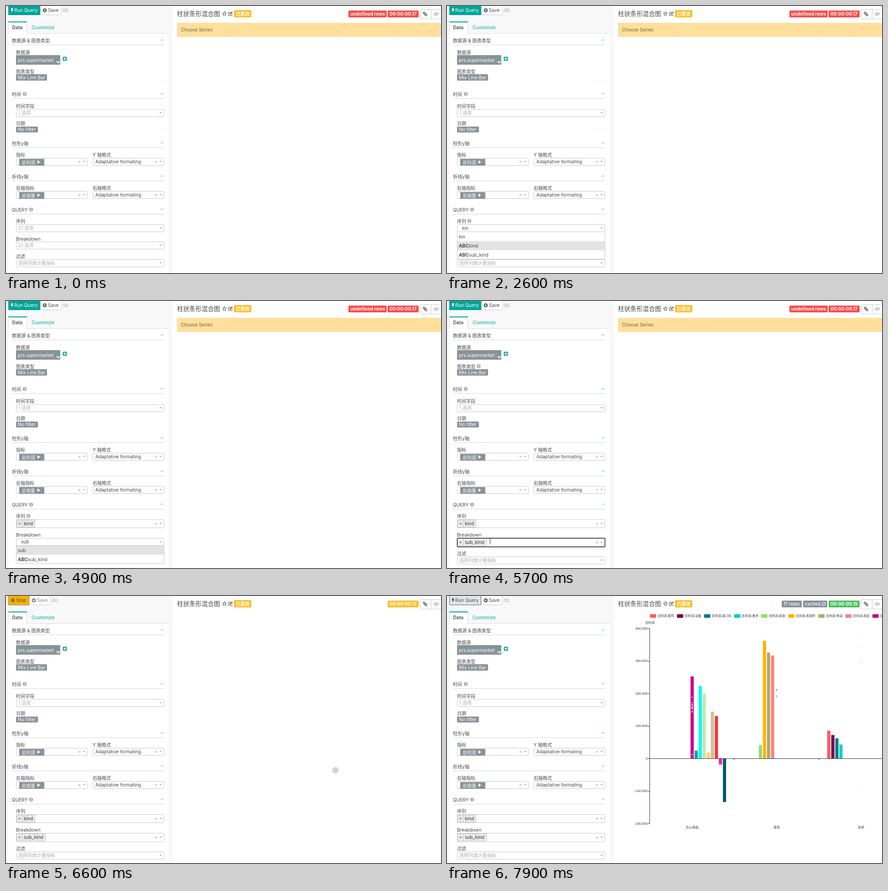
Recreate the animation shown at these times as an HTML page with a canvas. Size 954 px wide and 587 px high, loop 8 s.

```html
<!DOCTYPE html>
<html lang="zh-CN">
<head>
<meta charset="utf-8">
<title>Chart builder</title>
<style>
html, body { margin: 0; width: 100%; height: 100%; overflow: hidden; background: #fff; }
canvas { display: block; }
</style>
</head>
<body>
<canvas id="stage" width="954" height="587"></canvas>
<script>
const ctx = document.getElementById('stage').getContext('2d');
const LOOP = 8000, STEP = 100;
const UI = 'Inter, "Noto Sans CJK SC", "Noto Sans CJK JP", sans-serif';
const PLOT = '"Liberation Sans", "Noto Sans CJK SC", "Noto Sans CJK JP", sans-serif';
const TEAL = '#00a699', INK = '#484848', SLATE = '#879399', LINE = '#cccccc', HINT = '#aaaaaa';
const AMBER = '#fbc02d', RED = '#fe4a49', GREEN = '#4ac15f';
const CAP = 0.364; // half the cap height, in em

const between = (t, a, b) => t >= a && t < b;
const clamp = v => Math.max(0, Math.min(1, v));

function rect(x, y, w, h, fill) {
  ctx.fillStyle = fill;
  ctx.fillRect(x, y, w, h);
}

function box(x, y, w, h, r, fill, stroke, lw = 1) {
  ctx.beginPath();
  ctx.roundRect(x, y, w, h, r);
  if (fill) { ctx.fillStyle = fill; ctx.fill(); }
  if (stroke) { ctx.strokeStyle = stroke; ctx.lineWidth = lw; ctx.stroke(); }
}

// Text centred on y, with the baseline on a whole pixel
function text(s, x, y, color = INK, size = 10.15, weight = 400, align = 'left', family = UI) {
  ctx.font = `${weight} ${size}px ${family}`;
  ctx.textAlign = align;
  ctx.textBaseline = 'alphabetic';
  ctx.fillStyle = color;
  ctx.fillText(s, x, Math.round(y + size * CAP));
  return ctx.measureText(s).width;
}

function path(points, color, lw, closed) {
  ctx.beginPath();
  for (let i = 0; i < points.length; i += 2) ctx.lineTo(points[i], points[i + 1]);
  if (closed) ctx.closePath();
  if (lw) { ctx.strokeStyle = color; ctx.lineWidth = lw; ctx.stroke(); }
  else { ctx.fillStyle = color; ctx.fill(); }
}

function dot(x, y, r, fill, stroke, lw = 1) {
  ctx.beginPath();
  ctx.arc(x, y, r, 0, Math.PI * 2);
  if (fill) { ctx.fillStyle = fill; ctx.fill(); }
  if (stroke) { ctx.strokeStyle = stroke; ctx.lineWidth = lw; ctx.stroke(); }
}

// Icons
function info(x, y) {
  dot(x, y, 4.3, '#a8a8a8');
  rect(x - 0.8, y - 2.8, 1.6, 1.4, '#fff');
  rect(x - 0.8, y - 0.6, 1.6, 3.2, '#fff');
}

function bolt(x, y, color) {
  path([x - 1, y - 5, x + 2, y - 5, x + 1, y - 1.6, x + 3, y - 1.6, x - 1, y + 5, x, y + 0.6, x - 2.5, y + 0.6], color, 0, true);
}

function plusDisc(x, y, color) {
  dot(x, y, 4.3, color);
  rect(x - 2.5, y - 0.7, 5, 1.4, '#fff');
  rect(x - 0.7, y - 2.5, 1.4, 5, '#fff');
}

function keyboard(x, y) {
  box(x + 0.5, y - 3, 10.5, 6, 1, null, '#b5b5b5');
  for (let i = 0; i < 4; i++) rect(x + 2 + i * 2, y - 1.6, 1.2, 1, '#b5b5b5');
  rect(x + 3, y + 0.6, 5.5, 1, '#b5b5b5');
}

function star(x, y) {
  const pts = [];
  for (let i = 0; i < 10; i++) {
    const a = i * Math.PI / 5 - Math.PI / 2, r = i % 2 ? 2.2 : 4.8;
    pts.push(x + r * Math.cos(a), y + r * Math.sin(a));
  }
  path(pts, INK, 1, true);
}

function pencil(x, y) {
  path([x + 1, y - 3.5, x - 4, y - 3.5, x - 4, y + 4, x + 3.5, y + 4, x + 3.5, y + 1], INK, 1);
  path([x - 1.5, y + 1.5, x + 4.5, y - 4], INK, 2);
}

function chain(x, y) {
  ctx.save();
  ctx.translate(x, y);
  ctx.rotate(Math.PI / 4);
  box(-5, -1.7, 5, 3.4, 1.7, null, INK, 1.4);
  box(0, -1.7, 5, 3.4, 1.7, null, INK, 1.4);
  ctx.restore();
}

function refresh(x, y) {
  ctx.strokeStyle = '#fff';
  ctx.lineWidth = 1.3;
  for (const a of [0.3, 0.3 + Math.PI]) {
    ctx.beginPath();
    ctx.arc(x, y, 3.3, a, a + 2.3);
    ctx.stroke();
  }
  path([x + 4.3, y - 4, x + 4.3, y - 0.6, x + 1, y - 0.6], '#fff', 0, true);
  path([x - 4.3, y + 4, x - 4.3, y + 0.6, x - 1, y + 0.6], '#fff', 0, true);
}

function cross(x, y, color = '#999', r = 2) {
  path([x - r, y - r, x + r, y + r], color, 1);
  path([x - r, y + r, x + r, y - r], color, 1);
}

function arrow(x, y, up) {
  const d = up ? -1.2 : 1.2;
  path([x - 2.6, y - d, x + 2.6, y - d, x, y + d], '#999', 0, true);
}

// Form parts
function badge(s, x, y, w, h, fill, weight = 700, size = 10) {
  box(x, y, w, h, 2, fill);
  text(s, x + 4, y + h / 2 + 0.2, '#fff', size, weight);
}

function section(title, y, infoX) {
  text(title, 13, y + 1);
  if (infoX) info(infoX, y + 0.5);
  rect(13, y + 10, 334, 1, '#cfd8d8');
  path([339, y + 1.5, 342, y - 1.5, 345, y + 1.5], TEAL, 0.9);
}

function select(x, y, w, h, opt = {}) {
  const edge = opt.focus ? ['#111', 1.4] : ['#c8c8c8', 1];
  box(x + 0.5, y + 0.5, w - 1, h - 1, 2, '#fff', ...edge);
  const mid = y + h / 2;
  if (opt.hint) text(opt.hint, x + 5, mid, HINT);
  if (opt.value) text(opt.value, x + 6, mid);
  if (opt.clear) cross(x + w - 18, mid, opt.clear);
  arrow(x + w - 8, mid - 0.5, opt.open);
}

function metric(name, y) {
  select(22, y, 157, 17, { clear: '#999' });
  rect(29, y + 2, 55, 15, SLATE);
  text(name, 34, y + 10.5, '#fff', 10);
  path([69, y + 5, 75, y + 9, 69, y + 13], '#fff', 0, true);
}

function tag(name, y) {
  ctx.font = `400 10.15px ${UI}`;
  const w = Math.round(ctx.measureText(name).width) + 20;
  box(23.5, y + 2, w, 16, 1.5, '#ebebeb', '#c4c4c4');
  rect(35, y + 3, 1, 14, '#c4c4c4');
  cross(29.7, y + 10, '#333', 1.8);
  text(name, 39, y + 10, '#333');
  return 24 + w;
}

function caret(x, y) {
  rect(Math.round(x), y, 1, 13, '#333');
}

// Rows starting with "*" carry the text-column mark
function menu(y, rows, active) {
  rect(22, y, 325, rows.length * 20, '#fff');
  rows.forEach((row, i) => {
    const top = y + i * 20;
    if (i === active) rect(23, top, 323, 20, '#e3e3e3');
    let x = 26;
    if (row[0] === '*') x += text('ABC', x, top + 10, INK, 10.15, 700) + 0.3;
    text(row.replace('*', ''), x, top + 10);
  });
  ctx.strokeStyle = '#c8c8c8';
  ctx.lineWidth = 1;
  ctx.strokeRect(22.5, y - 0.5, 324, rows.length * 20);
}

function openSelect(y, typed, rows, active, blinkOn) {
  select(22, y, 325, 17, { open: true });
  const w = typed ? text(typed, 33, y + 8) + 0.5 : 0;
  if (blinkOn) caret(33 + w, y + 1);
  menu(y + 17, rows, active);
}

// Typed text at time t from [time, value] pairs
const typedAt = (t, keys) => keys.reduce((s, [at, v]) => t >= at ? v : s, '');

const COLUMNS = ['*order_id', '*ship_mode', '*customer', '*segment', '*region'];
const kindRows = s => s === '' ? COLUMNS
  : [s, '*kind', '*sub_kind', ...(s === 'k' ? ['*market'] : [])];
const subRows = s => s === '' ? COLUMNS
  : [s, '*sub_kind', ...(s === 's' ? ['*ship_mode', '*segment'] : [])];

function query(t) {
  const picked1 = t >= 3200, picked2 = t >= 5400;
  const open1 = between(t, 800, 3200), open2 = between(t, 3600, 5400);
  const y2 = picked1 ? 521 : 518;
  const y3 = picked2 ? 562 : picked1 ? 559 : 557;

  text('序列', 22, 473);
  if (between(t, 500, 2400) || between(t, 2600, 5500)) info(49, 472.5);
  text('Breakdown', 22, picked1 ? 514.5 : 512);
  text('过滤', 22, y3 - 6.5);
  select(22, y3, 325, 17, { hint: '选择列或计量指标' });

  if (picked2) {
    const focus = t < 6400;
    select(22, 521, 325, 20, { clear: '#999', focus });
    const end = tag('sub_kind', 520.5);
    if (focus && t < 5900) caret(end + 7, 522);
  } else if (!open2) {
    select(22, y2, 325, 17, { hint: '21 选项' });
  }

  if (picked1) {
    const focus = t < 3600;
    select(22, 480, 325, 19, { clear: t < 3300 ? '#ccc' : '#999', focus });
    const end = tag('kind', 479.5);
    if (focus) caret(end + 7, 482);
  } else if (!open1) {
    select(22, 480, 325, 17, { hint: '21 选项' });
  }

  if (open1) {
    const s = typedAt(t, [[1600, 'k'], [1700, 'ki'], [1900, 'kin']]);
    const blink = !between(t, 1300, 1600) && !between(t, 2400, 2900);
    openSelect(480, s, kindRows(s), t >= 2600 ? 1 : 0, blink);
  }
  if (open2) {
    const s = typedAt(t, [[4000, 's'], [4300, 'su'], [4400, 'sub']]);
    openSelect(521, s, subRows(s), t >= 5200 ? 1 : 0, t < 4900);
  }
}

function toolbar(t, running, done) {
  const w = running ? 46 : 70;
  if (running) {
    box(5, -3, w, 23, 2, '#ffb000', '#8a8f98', 1.2);
    dot(15, 9.5, 3.7, null, INK, 1.2);
    dot(15, 9.5, 1.8, INK);
    text('Stop', 22.5, 9.5);
  } else {
    if (done) box(5.5, -3, w - 1, 22.5, 2, '#e4e7ea', '#7f8da3', 1.5);
    else rect(5, 0, w, 20, t >= 6300 ? '#008a80' : TEAL);
    bolt(13, 9.5, done ? INK : '#fff');
    text('Run Query', 18, 9.5, done ? INK : '#fff', 10.3);
  }
  const x = 5 + w;
  box(x + 0.5, -3, 46, 22.5, 2, '#fff', LINE);
  plusDisc(x + 10, 9.5, running ? '#777' : INK);
  text('Save', x + 17, 9.5, running ? '#888' : INK);
  keyboard(x + 50, 9.5);
}

function form(t, running, done) {
  rect(0, 0, 366, 587, '#f8f8f8');
  rect(5, 60, 351, 527, '#fff');
  rect(5, 60, 351, 1, '#dcdcdc');
  rect(5, 34, 41, 27, '#fff');
  rect(5, 34, 1, 27, '#dcdcdc');
  rect(45, 34, 1, 27, '#dcdcdc');
  rect(5, 34, 41, 2, TEAL);
  text('Data', 13.5, 47.5, INK, 10.15, 600);
  text('Customize', 56, 47.5, TEAL);
  toolbar(t, running, done);

  section('数据源 & 图表类型', 75);
  text('数据源', 22, 102);
  rect(22, 108, 97, 21, SLATE);
  text('prs.supermarket', 26, 119, '#fff');
  path([111, 121.5, 114.5, 125, 118, 121.5], '#fff', 1.8);
  box(124.5, 111.5, 9, 9, 2, TEAL);
  rect(126, 115.2, 6, 1.6, '#fff');
  rect(128.2, 113, 1.6, 6, '#fff');
  text('图表类型', 22, 144);
  if (between(t, 5700, 5800)) info(69.5, 143.5);
  badge('Mix Line Bar', 22, 150, 68, 14, SLATE, 400, 10.3);

  section('时间', 193, 41);
  text('时间字段', 22, 220);
  select(22, 227, 325, 17, { hint: '1 选项' });
  text('日期', 22, 258);
  badge('No filter', 22, 265, 48, 13, SLATE, 400, 10.3);

  section('柱形y轴', 301);
  text('指标', 22, 327.5);
  text('Y 轴格式', 190, 327.5);
  if (between(t, 100, 200)) {
    info(236.5, 327);
    bolt(246, 327, '#a8a8a8');
  }
  metric('总利润', 334);
  select(190, 334, 157, 17, { value: 'Adaptative formating', clear: '#999' });

  section('折线y轴', 374);
  text('右轴指标', 22, 400.5);
  text('右轴格式', 190, 400.5);
  metric('总销量', 407);
  select(190, 407, 157, 17, { value: 'Adaptative formating', clear: '#999' });

  section('QUERY', 447, 55);
  query(t);
}

function header(running, done) {
  text('柱状条形混合图', 375, 17, INK, 13.5);
  star(479, 17);
  pencil(492, 17);
  badge('已更改', 500, 9, 38, 16, AMBER);
  if (done) {
    badge('17 rows', 734, 10, 44, 15, SLATE, 500, 9.9);
    badge('cached', 781, 10, 53, 15, SLATE, 500, 9.7);
    refresh(826.5, 17.5);
  } else if (!running) {
    badge('undefined rows', 751, 10, 84, 15, RED);
  }
  badge(done ? '00:00:00.15' : '00:00:00.17', 837, 10, 68, 15, done ? GREEN : running ? AMBER : RED);
  box(908.5, 7.5, 24, 21, 2, '#fff', LINE);
  box(932.5, 7.5, 30, 21, 0, '#fff', LINE);
  chain(919, 17.5);
  path([941, 15, 938.5, 17.5, 941, 20], INK, 1);
  path([944.5, 13.5, 942.5, 21.5], INK, 1);
  path([946, 15, 948.5, 17.5, 946, 20], INK, 1);
}

// Chart
const COLORS = ['#ff5a5f', '#7b0051', '#007a87', '#00d1c1', '#8ce071', '#ffb400', '#b4a76c', '#ff8083', '#cc0086',
  '#00a1b3', '#00ffeb', '#bbedab', '#ffd266', '#cbc29a', '#ff3339', '#ff1ab1', '#005c66'];
const KINDS = ['配件', '设备', '装订机', '美术', '纸张', '系固件', '电话', '用品', '复印机'];
const GROUPS = [
  { name: '办公用品', first: 8, ends: [176.5, 340, 197.5, 214.5, 344, 254, 263.5, 370.5, 453] },
  { name: '家具', first: 4, ends: [328, 98.5, 124, 130.5] },
  { name: '技术', first: 0, ends: [296, 305.5, 313, 326.5] },
];
const POINTS = [
  [222, 234, 238.5, 243, 247, 254, 348.5],
  [206, 219, 221],
  [90, 111, 142.5, 424],
];
const POINT_COLORS = [
  ['#cc0086', '#00a1b3', '#00ffeb', '#bbedab', '#ffd266', '#cbc29a', '#ff3339'],
  ['#cc0086', '#ffb400', '#b4a76c'],
  ['#bbedab', '#00ffeb', '#00d1c1', '#ffd266'],
];
const ZERO = 357, LEFT = 445, BAND = 185.3, SLOT = 8.87, CHART_START = 7000;

function chart(t) {
  const p = clamp((t - CHART_START) / 1000);
  const grow = 1 - (1 - p) ** 3;
  const label = (s, x, y, align, size) => text(s, x, y, '#333', size, 400, align, PLOT);

  let lx = LEFT;
  KINDS.forEach((kind, i) => {
    box(lx, 40, 14, 8, 2, COLORS[i]);
    label('总利润-' + kind, lx + 17, 44, 'left', 6.8);
    lx += 59.3 + (kind.length - 2) * 6.7;
  });
  label('总利润', LEFT, 59, 'center', 6.8);

  rect(444, 71, 1, 430, '#333');
  for (let i = 0; i <= 6; i++) {
    const y = 71 + i * 71.5;
    rect(441, Math.round(y), 4, 1, '#333');
    label(((4 - i) * 100000).toLocaleString('en-US'), 440, y, 'right', 7.4);
  }

  GROUPS.forEach((g, k) => {
    const cx = LEFT + BAND * (k + 0.5);
    g.ends.forEach((end, j) => {
      const x = cx + (g.first + j - 8) * SLOT - 3.5;
      rect(x, ZERO, 7, (end - ZERO) * grow, COLORS[g.first + j]);
    });
    label(g.name, cx, 508, 'center', 7);
  });

  rect(LEFT, 357, 509, 1, '#333');
  for (let k = 0; k < 3; k++) rect(Math.round(LEFT + BAND * k) - 1, 357, 1, 4, '#333');

  // Points show up as the reveal passes their column
  POINTS.forEach((ys, k) => {
    const show = clamp((t - CHART_START - 1000 * (k + 0.5) / 3) / 300);
    if (!show) return;
    const cx = LEFT + BAND * (k + 0.5);
    ctx.globalAlpha = 0.3 + 0.7 * show;
    ys.forEach((y, j) => dot(cx, y + 0.5, 0.7 + 0.7 * show, '#fff', POINT_COLORS[k][j], 0.8));
    ctx.globalAlpha = 1;
  });
}

function draw(t) {
  const running = between(t, 6500, 6800), done = t >= 6800;
  rect(0, 0, 954, 587, '#fff');
  form(t, running, done);
  header(running, done);
  if (t < 6500) {
    rect(375, 37, 579, 31, '#fedf9c');
    text('Choose Series', 383.5, 52.5, '#75643c');
  } else if (t < CHART_START) {
    dot(722.5, 383, 7, '#d0d4d6');
  } else {
    chart(t);
  }
}

function tick() {
  const t = performance.now() % LOOP;
  draw(Math.floor(t / STEP) * STEP);
  requestAnimationFrame(tick);
}
tick();
</script>
</body>
</html>
```
